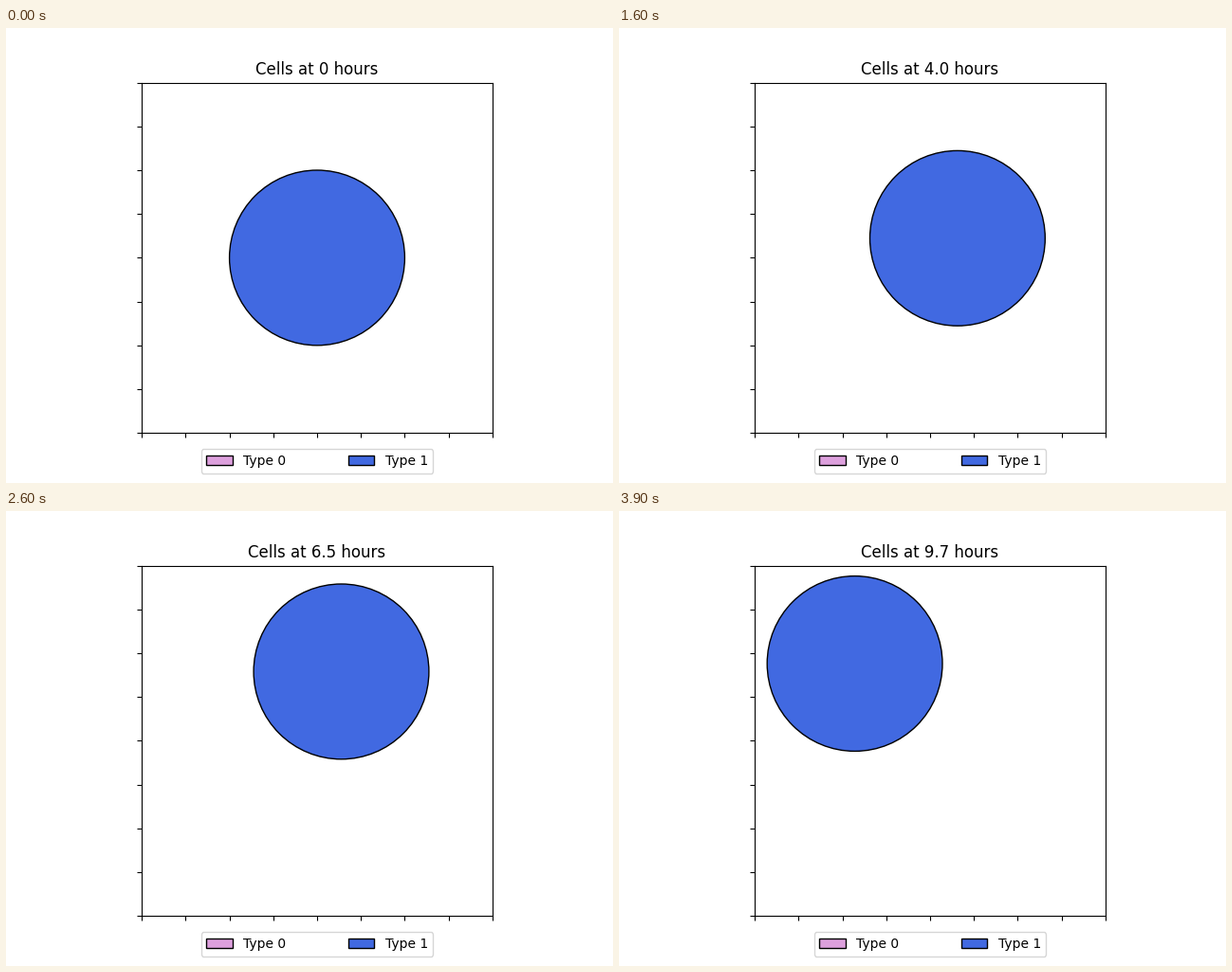
Animation, 640 px wide and 480 px high, one loop 4 s. Source, as a matplotlib script:

```python
import numpy as np
import matplotlib.pyplot as plt
from matplotlib.animation import FuncAnimation
from matplotlib.patches import Circle, Patch

FRAMES = 40
INTERVAL = 100
HALF = 184.8  # half the side of the square plot, one unit per pixel

# Turning points of the wandering cell: step -> offset from the centre
TURNS = {
    0: 0, 3: 67.5 - 3.5j, 5: 86 - 55.5j, 8: 41 - 65j,
    12: 77 - 90.5j, 13: 85 - 71.5j, 18: -8.5 + 82j,
    22: 25 + 62j, 24: -23 + 66j, 26: 25.5 + 73j, 30: 46 + 60j,
    32: -83 + 40.5j, 34: -2 + 84.5j, 39: -79.4 + 81.4j,
}


def position(step):
    p = np.interp(step, list(TURNS), list(TURNS.values()))
    return p.real, p.imag


def hours(step):
    # A quarter of an hour per step, cut to one decimal
    return "0" if step == 0 else f"{step * 5 // 2 / 10:.1f}"


fig, ax = plt.subplots(figsize=(6.4, 4.8), dpi=100)
ax.set_aspect("equal")
ax.set(xlim=(-HALF, HALF), ylim=(-HALF, HALF))
ticks = np.linspace(-HALF, HALF, 9)
ax.set_xticks(ticks)
ax.set_yticks(ticks)
ax.tick_params(labelbottom=False, labelleft=False)

cell = ax.add_patch(Circle((0, 0), HALF / 2, fc="royalblue", ec="black"))
title = ax.set_title("")
colors = ["plum", "royalblue"]
ax.legend(
    handles=[Patch(fc=c, ec="black", label=f"Type {k}")
             for k, c in enumerate(colors)],
    loc="upper center", bbox_to_anchor=(0.15, -0.13, 0.7, 0.102),
    ncol=2, mode="expand",
)


def update(step):
    cell.center = position(step)
    title.set_text(f"Cells at {hours(step)} hours")
    return cell, title


anim = FuncAnimation(fig, update, frames=FRAMES, interval=INTERVAL,
                     repeat=True, repeat_delay=0)
plt.show()
```
